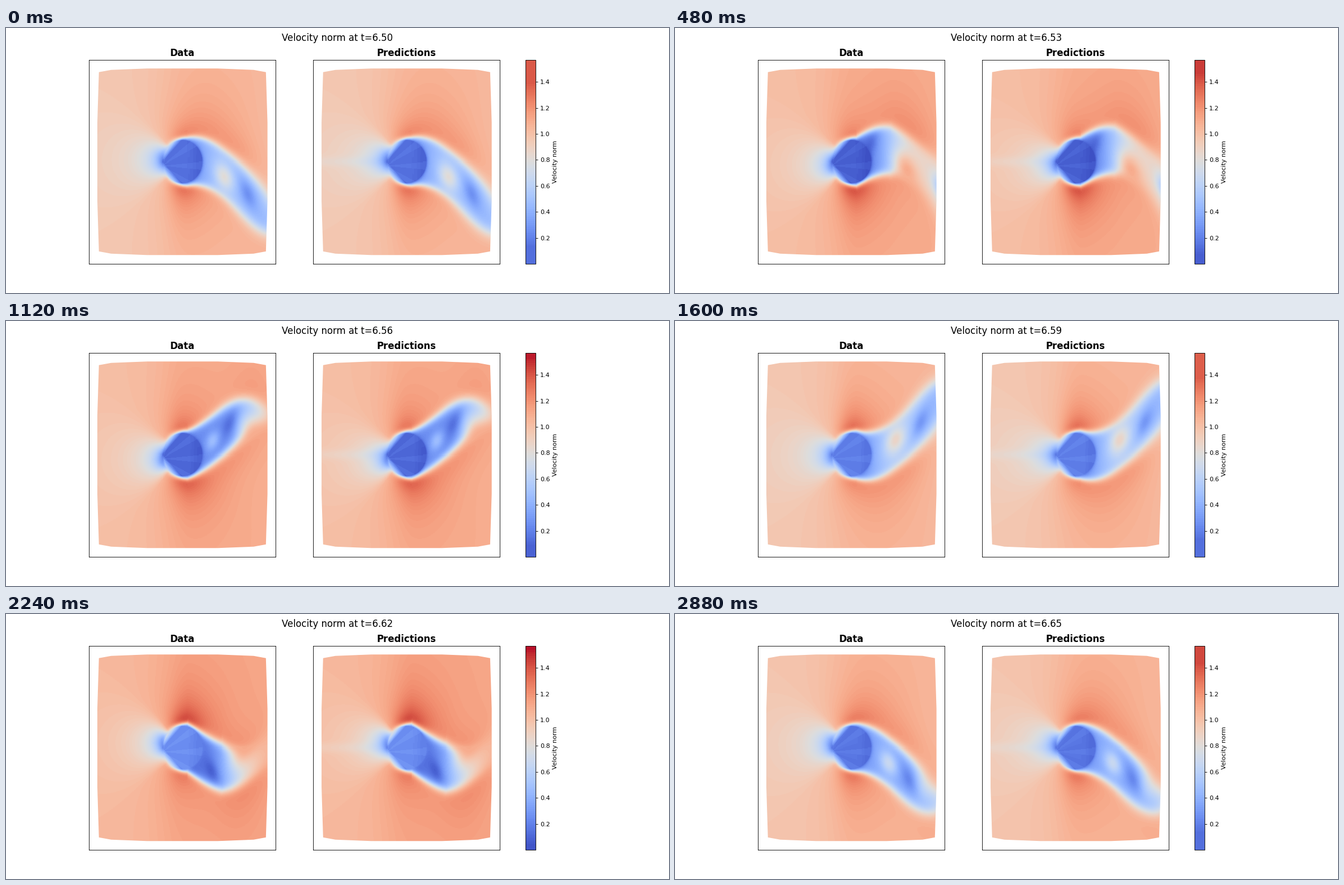
Write a matplotlib script that moves like this. It is 1183 by 473 pixels and loops after 3.04 s.

```python
import numpy as np
import matplotlib.pyplot as plt
from matplotlib.animation import FuncAnimation
from matplotlib.patches import Polygon

W, H, DPI = 1183, 473, 80
FRAMES, INTERVAL = 19, 160
PERIOD, HALF = FRAMES, FRAMES / 2   # one vortex pair, one vortex
VMAX = 1.57
CX, CY, RX, RY = 315.5, 239.0, 34.5, 37.5   # cylinder

X0, X1, Y0, Y1 = 160, 470, 70, 408
xs = np.arange(X0, X1) + .5
GX, GY = np.meshgrid(xs, np.arange(Y0, Y1) + .5)
NX, NY = (GX - CX) / RX, (GY - CY) / RY
R = np.hypot(NX, NY)


def step(z):
    return 1 / (1 + np.exp(-np.clip(z, -40, 40)))


def wave(t, peak, period):
    return np.cos(2 * np.pi * (t - peak) / period)


def blob(y, cx, cy, width, length):
    """Soft ellipse leaning downstream."""
    lean = .4
    dx, dy = GX - cx, y - cy
    a, b = dx * lean - dy, dx + dy * lean
    return np.exp(-((a / length) ** 2 + (b / width) ** 2) / (1 + lean ** 2))


def wake(k):
    """Upper edge, lower edge and inner speed of the wake along x."""
    d = xs - 345
    lag = 4.7 + .036 * d
    centre = CY - np.clip(14 + .65 * d, 0, None) * wave(k, lag, PERIOD)
    nose = np.sqrt(np.clip(1 - (np.clip(330 - xs, 0, None) / 52) ** 2, 0, 1))
    far = np.clip(xs - 385, 0, None)
    half = 42 * nose - .14 * far - .22 * far * wave(k, lag - 2.3, HALF)
    speed = .24 + .004 * d + (.1 + .0019 * d) * wave(k, .042 * d, HALF)
    return centre - half, centre + half, np.clip(speed, .06, None)


def stream(k):
    """Flow round the cylinder without its wake."""
    sway = 9 * wave(k, 5.8, PERIOD) * step((285 - GX) / 8) / RY
    ny = NY - sway
    rp = np.maximum(np.hypot(NX, ny), 1)
    p = (ny ** 2 - NX ** 2) / rp ** 4
    p = np.where(p > 0, .25 * p, np.where(NX > 0, .3 * p, p))
    inlet = 1.005 + .04 * wave(k, 5, HALF)
    return inlet * (1 + p) + .08 * step((GX - 280) / 18)


def body(k):
    """Flat facets inside the cylinder, fanned from its front point."""
    facet = np.round(np.arctan2(GY - 246, GX - 279) / .2)
    v = .16 - .09 * wave(k, 4, PERIOD) + .02 * np.sin(2.1 * facet + 1.5)
    chord = np.clip(.69 * abs(NY) - .72 * NX - .74, 0, .26)
    return np.clip(v - .04 * step((NX - .55) * 12) + 1.8 * chord, .03, 1)


def field(k, predicted):
    top, low, speed = wake(k)
    v = stream(k)
    if predicted:
        v = v - .05 * np.exp(-((GY - CY) / 9) ** 2) * step((280 - GX) / 12)

    # fast layers outside the two edges, half a period apart
    reach = step((GX - 300) / 9) * step((455 - GX) / 18)
    for edge, t in ((low, k), (top, k - HALF)):
        boost = .15 + .15 * wave(t, 5 + .06 * (GX - 345), PERIOD)
        v = v + boost * reach * np.exp(-abs(GY - edge) / 48)

    # slow cores travel along the wake
    inner = speed + 0 * GY
    for y, t in ((GY, k), (2 * CY - GY, k - HALF)):
        age = (t - 2) % PERIOD - 3
        slow = .07 + .008 * age ** 2
        spot = blob(y, 372 + 13.5 * age, 180 + .9 * (age - 4) ** 2, 11, 25)
        inner = inner + np.minimum(slow - inner, 0) * spot

    soft = 2.8 + .03 * np.clip(xs - 320, 0, None)
    mask = (step((GY - top) / (soft * np.hypot(1, np.gradient(top))))
            * step((low - GY) / (soft * np.hypot(1, np.gradient(low)))))
    v = v + (inner - v) * mask * step((GX - 290) / 4)

    # fast pockets open behind the cylinder and drift out
    for y, t in ((GY, k), (2 * CY - GY, k - HALF)):
        age = (t - 5) % PERIOD
        fast = min(.2 + .135 * age, 1.1)
        spot = blob(y, 352 + 8.3 * age, 212 + .9 * (age - 3.8) ** 2,
                    9 + 1.3 * age, 14 + 2.4 * age)
        v = v + np.maximum(fast - v, 0) * spot * step(2 * (13 - age))

    inside = body(k)
    layer = 1 - np.exp(-np.clip(R - 1, 0, None) / .07)
    return np.clip(inside + (v - inside) * layer, .01, VMAX)


def bar(k):
    """Colour scale, held flat outside the speeds in use."""
    lo = .09 - .05 * wave(k, 4.8, HALF)
    hi = 1.47 + .1 * wave(k, 5.5, HALF)
    n = cmap.N
    return np.clip((np.arange(n) + .5) * VMAX / n, lo, hi)[:, None]


def title(k):
    return f"Velocity norm at t={6.504 + .0083 * k:.2f}"


def outline():
    """Domain border, one corner mirrored to all four."""
    corner = np.array([(151.8, 70), (149, 160), (127, 164), (63, 166.5)])
    turns = [(1, 1), (-1, 1), (-1, -1), (1, -1)]
    parts = [corner[::sx * sy] * (sx, sy) for sx, sy in turns]
    return np.concatenate(parts) + (314.8, 238.8)


def panel(ax, name, predicted):
    im = ax.imshow(field(0, predicted), extent=(X0, X1, Y1, Y0), cmap=cmap,
                   vmin=0, vmax=VMAX, aspect="auto", interpolation="nearest")
    ax.set(xlim=(147.9, 481.3), ylim=(421, 56.8), xticks=[], yticks=[])
    ax.set_title(name, fontsize=15, fontweight="bold")
    im.set_clip_path(Polygon(outline(), transform=ax.transData))
    return im


cmap = plt.get_cmap("coolwarm", 100)
fig, (left, right) = plt.subplots(1, 2, figsize=(W / DPI, H / DPI), dpi=DPI,
                                  facecolor="white")
data = panel(left, "Data", False)
pred = panel(right, "Predictions", True)
scale = fig.colorbar(data, ax=[left, right], label="Velocity norm",
                     ticks=np.arange(.2, 1.5, .2), format="%.1f")
head = fig.suptitle(title(0), fontsize=15)


def update(k):
    data.set_data(field(k, False))
    pred.set_data(field(k, True))
    scale.solids.set_array(bar(k))
    head.set_text(title(k))
    return data, pred, scale.solids, head


anim = FuncAnimation(fig, update, frames=FRAMES, interval=INTERVAL,
                     repeat=True, repeat_delay=0, blit=False)
plt.show()
```
